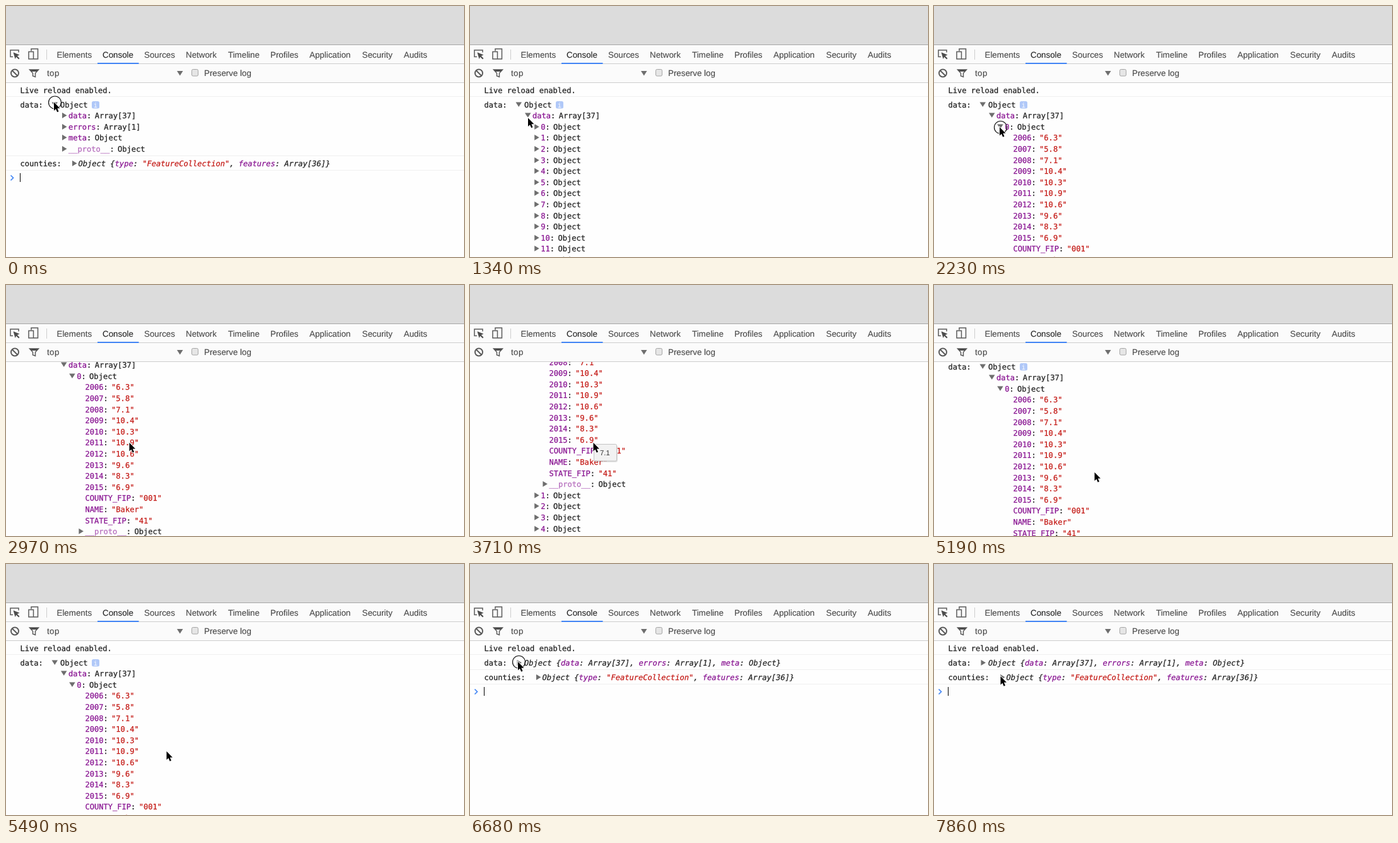
Animation of 726 by 398 pixels, one loop 8 s. Source, as an HTML page:

```html
<!DOCTYPE html>
<html lang="en">
<head>
<meta charset="utf-8">
<title>Console</title>
<style>
html, body { margin: 0; width: 100%; height: 100%; overflow: hidden; background: #fefefe; }
svg { display: block; }
text { white-space: pre; text-rendering: geometricPrecision; stroke-width: .25; }
#log { font: 12.07px "DejaVu Sans Mono", monospace; fill: #222; }
#log text { stroke: #222; }
#bar, #top { font: 13.35px "Liberation Sans", Arial, sans-serif; fill: #4c4c4c; }
#bar text { stroke: #4c4c4c; stroke-width: .15; }
#log .key { fill: #881391; stroke: #881391; }
#log .proto { fill: #b56cbd; stroke: #b56cbd; }
#log .str { fill: #c41a16; stroke: #c41a16; }
#log .badge { fill: #fff; stroke: none; }
.preview { font-style: italic; }
.arrow { fill: #6e6e6e; }
.rule { stroke: #f0f0f0; }
.icon { fill: none; stroke: #5a5a5a; stroke-width: 1.5; }
</style>
</head>
<body>
<svg width="726" height="398" viewBox="0 0 726 398">
  <g id="log"></g>
  <g id="bar">
    <rect width="726" height="61" fill="#dcdcdc"/>
    <rect y="61" width="726" height="61" fill="#fbfbfb"/>
    <path d="M0 61.5H726" stroke="#a6a6a6"/>
    <path d="M0 91.5H726M0 121.5H726M64.5 69V85" stroke="#cdcdcd"/>
    <path d="M145 91H210.500" stroke="#4285f4" stroke-width="2"/>
    <g transform="translate(0 -.5)">
      <path class="icon" d="M11 81H7V70.500H20V74"/>
      <path d="M11.500 74L21.500 78L17.800 79.700L21.500 83.500L20 85L16.200 81.200L14.500 84.500Z"/>
      <path class="icon" d="M40 72V68.500H50.500V84.500H44"/>
      <rect class="icon" x="36" y="73" width="7.500" height="11.500"/>
    </g>
    <g class="icon"><circle cx="14" cy="106.500" r="6" stroke-width="2"/><path d="M10 102.500L18 110.500" stroke-width="2"/></g>
    <path class="icon" d="M37.500 101H51.500L46.500 106.500V112.500L42.500 111V106.500Z"/>
    <path d="M37.500 101H51.500L48.500 104H40.500Z"/>
    <text x="65" y="111" letter-spacing=".4">top</text>
    <path class="arrow" d="M271 103H280.500L275.750 110.500Z"/>
    <rect x="294.500" y="100.500" width="10" height="10.500" rx="2" fill="#e6e6e6" stroke="#a5a5a5"/>
    <text x="314" y="111">Preserve log</text>
  </g>
  <g id="top"></g>
</svg>
<script>
const LOOP = 8000, TICK = 148.3, ROW = 17.6, CHAR = 7.26;
const el = id => document.getElementById(id);

const tabs = { Elements: 80.5, Console: 153, Sources: 219, Network: 285, Timeline: 352,
  Profiles: 419, Application: 481, Security: 564.5, Audits: 630.5 };
for (const [name, x] of Object.entries(tabs))
  el('bar').innerHTML += `<text x="${x}" y="82"${name == 'Console' ? ' fill="#222"' : ''}>${name}</text>`;

// Keys are [tick, ...values]; values run linearly between them.
const cursorKeys = [[2, 76, 152.5], [6, 92, 177.5], [9, 92, 177.5], [13, 104, 192], [15, 104, 192],
  [18, 195.5, 250], [26, 195.5, 250], [29, 254.5, 297], [37, 254.5, 297], [38, 228, 276],
  [40, 107, 190], [43, 76, 155], [47, 76, 155], [53, 105.5, 178]];
const scrollKeys = [[19, 0], [20, 47], [21, 78], [22, 100], [23, 115], [24, 115], [25, 122],
  [32, 122], [33, 100], [34, 62], [35, 27], [36, 7], [37, 0]];

function at(keys, n) {
  const i = keys.findIndex(k => k[0] > n);
  if (i < 0) return keys.at(-1).slice(1);
  if (!i) return keys[0].slice(1);
  const a = keys[i - 1], b = keys[i], p = (n - a[0]) / (b[0] - a[0]);
  return a.slice(1).map((v, j) => v + (b[j + 1] - v) * p);
}

const within = (n, from, to) => n >= from && n < to;
const text = (x, y, s, cls = '') => `<text x="${x}" y="${y}" class="${cls}">${s}</text>`;
const span = (cls, s) => `<tspan class="${cls}">${s}</tspan>`;
const key = s => span('key', s);
const rule = y => `<path class="rule" d="M0 ${y + .5}H726"/>`;
const arrow = (x, y, open) =>
  `<path class="arrow" d="M${open ? `${x - 2} ${y - 8.5}h9.500l-4.750 7.500` : `${x} ${y - 9}v9l7.500 -4.500`}z"/>`;

const dataPreview = `Object {${key('data')}: Array[37], ${key('errors')}: Array[1], ${key('meta')}: Object}`;
const countyPreview = `Object {${key('type')}: ${span('str', '"FeatureCollection"')}, ${key('features')}: Array[36]}`;
const rates = [6.3, 5.8, 7.1, 10.4, 10.3, 10.9, 10.6, 9.6, 8.3, 6.9];
const record = [...rates.map((v, i) => [2006 + i, v]), ['COUNTY_FIP', '001'], ['NAME', 'Baker'], ['STATE_FIP', 41]];

// Rows are [level, name, value, open]; open is undefined for plain values.
function treeRows(dataOpen, firstOpen) {
  const rows = [[0, 'data', 'Array[37]', dataOpen]];
  if (dataOpen) for (let i = 0; i < 37; i++) {
    const open = firstOpen && !i;
    rows.push([1, i, 'Object', open]);
    if (open) rows.push(...record.map(([k, v]) => [2, k, `"${v}"`]), [2, '__proto__', 'Object', false]);
  }
  return [...rows, [0, 'errors', 'Array[1]', false], [0, 'meta', 'Object', false], [0, '__proto__', 'Object', false]];
}

function treeRow([level, name, value, open], y) {
  const x = 99 + level * 13.2, plain = open === undefined;
  return (plain ? '' : arrow(x - 10, y, open)) +
    text(x, y, span(name == '__proto__' ? 'proto' : 'key', name) + ':') +
    text(x + (`${name}`.length + 1) * CHAR + 5.4, y, value, plain ? 'str' : '');
}

function drawLog(n) {
  const open = n < 45;
  let y = 161, s = text(22.5, 138, 'Live reload enabled.') + rule(143) + text(22.5, y, 'data:') + arrow(74.5, y, open);
  if (open) {
    s += text(86, y, 'Object') + `<rect x="136" y="151" width="12" height="11.500" rx="2.500" fill="#b0c8f8"/>` +
      `<text class="badge" x="138.700" y="160.500" font-size="10.500">i</text>`;
    const rows = treeRows(n >= 7, n >= 14), rowY = i => 161 + Math.floor(ROW * (i + 1));
    rows.forEach((row, i) => s += treeRow(row, rowY(i)));
    y = rowY(rows.length - 1);
  } else s += text(86, y, dataPreview, 'preview');
  s += rule(y + 6);
  y += 23;
  s += text(22.5, y, 'counties:') + arrow(105, y, false) + text(114.5, y, countyPreview, 'preview') + rule(y + 6) +
    `<path d="M7.500 ${y + 14.5}l4 4l-4 4" fill="none" stroke="#4285f4" stroke-width="1.700"/>`;
  if (!within(n, 4, 7) && !within(n, 48, 51))
    s += `<path d="M22.500 ${y + 11}v14" stroke="#000"/>`;
  el('log').innerHTML = s;
  el('log').setAttribute('transform', `translate(0 ${-at(scrollKeys, n)[0]})`);
}

function drawTop(n) {
  const [x, y] = at(cursorKeys, n);
  let s = '';
  if (within(n, 25, 27))
    s += `<rect x="198" y="254" width="36" height="27" rx="3" fill="#000" opacity=".12"/>
      <rect x="196.500" y="252.500" width="36" height="26.500" rx="2" fill="#f2f2f2" stroke="#c4c4c4"/>
      <text x="206" y="270" font-size="11.300" fill="#333">7.1</text>`;
  if (n < 1 || within(n, 7, 9) || within(n, 14, 16) || n == 45)
    s += `<circle cx="${x + 1.5}" cy="${y + .5}" r="10" fill="none" stroke="#111" stroke-width="1.200"/>`;
  s += `<path transform="translate(${x} ${y})" d="M0 0V13.500L3 10.700L5.200 15.700L7.500 14.700L5.400 9.800H9.500Z"
    fill="#000" stroke="#fff" stroke-width="1.600" paint-order="stroke"/>`;
  el('top').innerHTML = s;
}

let last = -1;
function frame() {
  const n = Math.floor(performance.now() % LOOP / TICK);
  if (n != last) {
    drawLog(n);
    drawTop(n);
    last = n;
  }
  requestAnimationFrame(frame);
}
frame();
</script>
</body>
</html>
```
